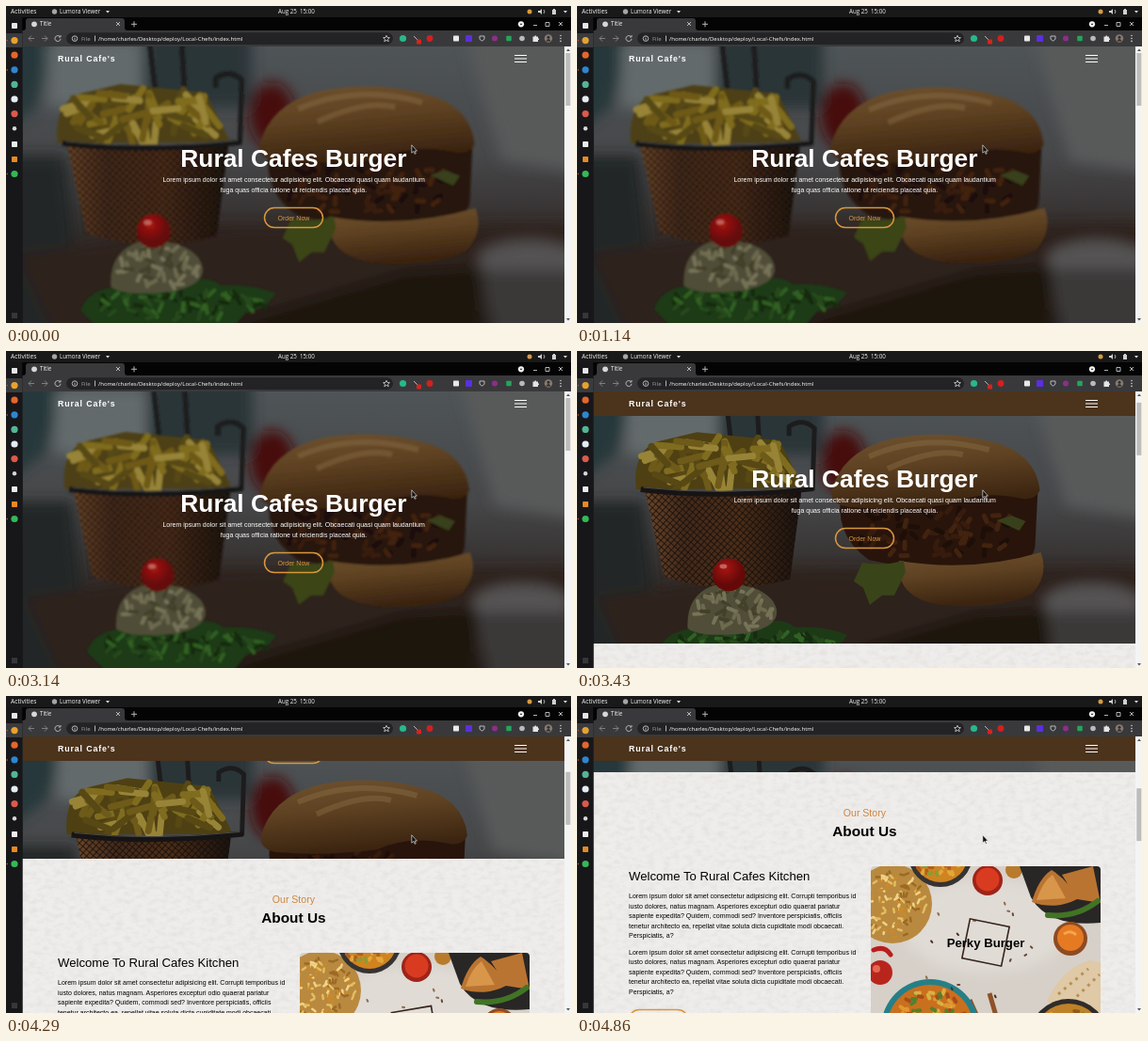
An HTML page for the animation above (5.01 s loop, 600 by 337 pixels).

```html
<!DOCTYPE html>
<html lang="en">
<head>
<meta charset="utf-8">
<title>Title</title>
<style>
html, body { margin: 0; width: 100%; height: 100%; overflow: hidden; background: #000; }
svg { display: block; width: 600px; height: 337px; }
text { white-space: pre; }
.page { font: 7.03px "Liberation Sans", Arial, sans-serif; }
.ui { font: 6.2px "Open Sans", "Noto Sans", sans-serif; fill: #f2f2f2; }
.url { font-size: 6px; }
.mid { text-anchor: middle; }
.bold { font-weight: bold; }
.line { fill: none; stroke: #c4c6c8; stroke-width: .9; }
.button { fill: none; stroke: #d8963f; stroke-width: 1.5; }
</style>
</head>
<body>
<svg viewBox="0 0 600 337">
<defs>
  <clipPath id="view"><rect x="17.5" y="43" width="576" height="294"/></clipPath>
  <clipPath id="card"><rect x="312" y="437" width="244" height="200" rx="4"/></clipPath>
  <filter id="soft"><feGaussianBlur stdDeviation=".8"/></filter>
  <filter id="haze" x="-30%" y="-30%" width="160%" height="160%"><feGaussianBlur stdDeviation="7"/></filter>
  <filter id="wall" x="0" y="0" width="100%" height="100%">
    <feTurbulence type="fractalNoise" baseFrequency=".12 .2" numOctaves="4" seed="4"/>
    <feColorMatrix values="0 0 0 0 .55  0 0 0 0 .53  0 0 0 0 .51  .5 0 0 0 -.2"/>
  </filter>
  <linearGradient id="room" x2="0" y2="1">
    <stop offset="0" stop-color="#50575a"/><stop offset=".4" stop-color="#464749"/>
    <stop offset=".62" stop-color="#332e2c"/><stop offset="1" stop-color="#1c1513"/>
  </linearGradient>
  <linearGradient id="bun" x2=".25" y2="1">
    <stop offset="0" stop-color="#6f522f"/><stop offset=".45" stop-color="#5f4222"/><stop offset="1" stop-color="#3b2410"/>
  </linearGradient>
  <linearGradient id="copper">
    <stop offset="0" stop-color="#6a4528"/><stop offset=".25" stop-color="#43291a"/>
    <stop offset=".6" stop-color="#4c2d17"/><stop offset="1" stop-color="#1b120e"/>
  </linearGradient>
  <radialGradient id="tomato" cx=".4" cy=".3"><stop offset="0" stop-color="#a81512"/><stop offset="1" stop-color="#650908"/></radialGradient>
  <pattern id="mesh" width="5" height="5" patternUnits="userSpaceOnUse" patternTransform="rotate(42)">
    <path d="M0 0H5M0 0V5" stroke="#120d0b" stroke-width="1.6"/>
  </pattern>
</defs>

<g clip-path="url(#view)">
  <g id="photo">
    <rect x="-20" y="20" width="660" height="350" fill="url(#room)"/>
    <g filter="url(#haze)">
      <path d="M-10 30H65L40 110 0 140Z" fill="#26373a"/>
      <path d="M52 42H150V110H52Z" fill="#646b6c"/>
      <path d="M150 30H262V110H150Z" fill="#2b3437"/>
      <path d="M480 30H620V180L520 165Z" fill="#595a5a"/>
      <path d="M-10 160H70L90 350H-10Z" fill="#242526"/>
      <ellipse cx="283" cy="118" rx="24" ry="34" fill="#46100f"/>
      <path d="M20 262L220 232 620 230V300L330 350H60Z" fill="#2e231f"/>
      <path d="M200 345L420 280 500 275V350Z" fill="#1b1311"/>
      <ellipse cx="548" cy="268" rx="52" ry="20" fill="#545352"/>
      <path d="M498 278H620V350H512Z" fill="#3b3939"/>
    </g>
    <g filter="url(#soft)">
      <path d="M157 43l6 52M190 43l3 50M225 90V80Q240 70 252 82L250 148" fill="none" stroke="#1d1c1d" stroke-width="5"/>
      <path d="M62 147Q58 106 85 96L127 86 215 95 240 146Z" fill="#4e4012"/>
      <g id="fries"/>
      <path d="M72 150H238L226 243Q155 262 92 240Z" fill="url(#copper)"/>
      <path d="M72 150H238L226 243Q155 262 92 240Z" fill="url(#mesh)"/>
      <path d="M67 147Q150 157 251 146" fill="none" stroke="#171415" stroke-width="6"/>
      <path d="M70 145Q150 154 248 144" fill="none" stroke="#4c4a47"/>
      <path d="M282 145H490L487 207Q485 226 460 229 400 242 310 222 270 195 282 145Z" fill="#28140b"/>
      <g id="patty"/>
      <path d="M342 223Q420 236 493 214Q502 238 484 258Q450 276 385 270Q338 262 342 223Z" fill="url(#bun)"/>
      <path d="M270 150Q280 108 330 94Q385 82 440 96Q488 108 492 148Q488 158 474 157Q430 147 395 163Q340 170 290 166Q270 164 270 150Z" fill="url(#bun)"/>
      <path d="M310 112Q370 86 438 105M330 125Q380 102 410 110" fill="none" stroke="#8d7049" stroke-width="6" opacity=".4"/>
      <path d="M303 225q22 4 44-2l2 12-12 25-13 0-13 10-7-18-10-7Z" fill="#3a4419"/>
      <path d="M446 180l16-5 15 6-7 10Z" fill="#37401b"/>
      <path d="M86 320q6-20 32-24l80-6q20-7 33 4 28-2 56 8-9 16-31 20l-14 17H105Z" fill="#1d3a16"/>
      <g id="lettuce"/>
      <path d="M117 295Q115 258 147 249 190 245 207 265 224 290 182 300 130 306 117 295Z" fill="#504e38"/>
      <g id="slaw"/>
      <circle cx="161" cy="238" r="17.500" fill="url(#tomato)"/>
      <ellipse cx="155" cy="229" rx="4" ry="2.500" fill="#d0847c" opacity=".7"/>
    </g>
  </g>

  <g id="scroll" class="page">
    <g class="mid" fill="#fff">
      <text class="bold" x="305.4" y="170.5" font-size="26.35">Rural Cafes Burger</text>
      <text x="305.6" y="187.2">Lorem ipsum dolor sit amet consectetur adipisicing elit. Obcaecati quasi quam laudantium</text>
      <text x="305.4" y="197.8">fuga quas officia ratione ut reiciendis placeat quia.</text>
      <text x="305.4" y="227.5" fill="#d8963f">Order Now</text>
    </g>
    <rect class="button" x="274.5" y="214.6" width="62" height="21" rx="10.5"/>

    <rect x="17" y="337" width="577" height="290" fill="#efedeb"/>
    <rect x="17" y="337" width="577" height="290" filter="url(#wall)"/>
    <text class="mid" x="305.4" y="384" font-size="10.54" fill="#cc8440">Our Story</text>
    <text class="mid bold" x="305.4" y="405" font-size="15.4">About Us</text>
    <text x="55" y="452" font-size="13.15">Welcome To Rural Cafes Kitchen</text>
    <g id="copy"/>
    <rect class="button" x="55.5" y="589.4" width="62" height="21" rx="10.5"/>

    <g clip-path="url(#card)">
      <rect x="312" y="437" width="244" height="200" fill="#d6d0c9"/>
      <ellipse cx="435" cy="500" rx="90" ry="50" fill="#e0dbd5" filter="url(#haze)"/>
      <circle cx="335" cy="477" r="42" fill="#b9893f"/>
      <g id="rice"/>
      <circle cx="386" cy="425" r="34" fill="#363334"/><circle cx="386" cy="425" r="29" fill="#cf8420"/>
      <g id="curry"/>
      <circle cx="436" cy="452" r="16" fill="#9e2419"/><circle cx="436" cy="451" r="12.5" fill="#d93b20"/>
      <circle cx="464" cy="441" r="9" fill="#b87b2c"/>
      <path d="M470 437H556V497Q500 502 482 470Z" fill="#292626"/>
      <path d="M483 475Q490 450 504 441 522 452 531 472 508 484 483 475ZM515 446L548 437 556 476 531 472Z" fill="#ba7431"/>
      <path d="M488 473Q494 454 505 446L519 471Z" fill="#d8964b"/>
      <path d="M500 489Q530 492 553 474" fill="none" stroke="#417424" stroke-width="6" stroke-linecap="round"/>
      <circle cx="524" cy="514" r="18" fill="#8e4b24"/><circle cx="524" cy="513" r="14" fill="#e67a22"/>
      <path d="M517 509q7-5 13 1" fill="none" stroke="#f5a44a" stroke-width="3"/>
      <path d="M499 580Q515 545 545 537L560 540V594H510Z" fill="#dfc9a6"/>
      <path d="M511 573L543 546M525 581L555 552" stroke="#b9905a" stroke-width="3" stroke-dasharray="3 5"/>
      <path d="M315 526Q327 521 333 531" fill="none" stroke="#b91e1c" stroke-width="5" stroke-linecap="round"/>
      <circle cx="322" cy="550" r="13" fill="#b8251c"/><circle cx="318" cy="546" r="4" fill="#e56752"/>
      <path d="M417 579l8 18M438 572l7 24" stroke="#8f5128" stroke-width="5"/>
      <circle cx="375" cy="609" r="52" fill="#267f87"/><circle cx="375" cy="609" r="46" fill="#c9701e"/>
      <g id="stew"/>
      <circle cx="522" cy="620" r="42" fill="#2e2b2a"/><circle cx="522" cy="620" r="37" fill="#bf8128"/>
      <g id="spice"/>
    </g>
    <rect id="frame" x="412.7" y="496.7" width="42.6" height="42.6" fill="none" stroke="#36231b" stroke-width="1.6"/>
    <text class="mid bold" x="434" y="523" font-size="13.18">Perky Burger</text>
  </g>

  <rect id="nav" x="17" y="43" width="577" height="26" fill="#4b331c"/>
  <text class="page bold" x="55" y="59.2" fill="#fff" style="font-size:8.8px;letter-spacing:.88px">Rural Cafe's</text>
  <path d="M540 52.5h13M540 56h13M540 59.5h13" stroke="#fff" stroke-width="1.1"/>
</g>

<rect x="593" y="43" width="7" height="294" fill="#f4f4f4"/>
<path d="M595 48l2-2.5 2 2.5ZM595 332l2 2.5 2-2.5Z" fill="#555"/>
<rect id="thumb" x="594.3" y="50" width="5" height="56" fill="#bdbdbd"/>

<rect width="600" height="12" fill="#191919"/>
<rect y="12" width="17.5" height="325" fill="#17171a"/>
<rect y="29" width="17.5" height="15" fill="#3b3b3e"/>
<rect x="17.5" y="12" width="582.5" height="14" fill="#040404"/>
<path d="M18 26q3 0 3-3v-7q0-3 3-3h99q3 0 3 3v7q0 3 3 3Z" fill="#39393b"/>
<rect x="17.5" y="26" width="582.5" height="17" fill="#39393b"/>
<rect x="64" y="28.3" width="347" height="12.6" rx="6.3" fill="#232325"/>
<g class="ui">
  <text x="5" y="8.4" style="font-size:6.7px">Activities</text>
  <text x="57" y="8.4">Lumora Viewer</text>
  <text x="289" y="8.4">Aug 25  15:00</text>
  <text x="36" y="21.3">Title</text>
  <text class="url" x="80" y="37" fill="#a0a3a6">File</text>
  <text class="url" x="98" y="37" fill="#fff">/home/charles/Desktop/deploy/Local-Chefs/index.html</text>
</g>
<path d="M106 5h4l-2 2.5ZM592 5h4l-2 2.5Z" fill="#ddd"/>
<path d="M565 5h2l2-2v6l-2-2h-2ZM580 4h4v5h-4ZM581 3h2v1h-2Z" fill="#d0d0d0"/>
<g class="line">
  <path d="M571 4q2 2 0 4M117 17l4 4m0-4l-4 4M133 19.3h6m-3-3v6"/>
  <path d="M534 20.5h4M547 17.5h4v4h-4ZM561 17l4 4m0-4l-4 4" transform="translate(26 0)"/>
  <path d="M57 32.3a3 3 0 1 0 1 2.5M58 31v2h-2M94.5 31.5v6"/>
  <path d="M30 34.5h-6m3-3l-3 3 3 3M38 34.5h6m-3-3l3 3-3 3" stroke="#85878a"/>
  <circle cx="73" cy="34.6" r="2.8"/><path d="M73 34v2.3M73 32.7v.6"/>
  <path d="M404 31.3l1 2.2 2.4.2-1.8 1.6.6 2.4-2.2-1.3-2.2 1.3.6-2.4-1.8-1.6 2.4-.2Z"/>
  <path d="M433 32l5 5M503 32h5v3q-2.5 4-5 0Z"/>
</g>
<path d="M559.5 32.5h2v-1h1.5v1h2v2h1v1.5h-1v2h-5.5Z" fill="#e4e4e4"/>
<path d="M589 31.5v.1m0 2.8v.1m0 2.8v.1" stroke="#ddd" stroke-width="1.5" stroke-linecap="round"/>
<rect x="436" y="35.5" width="5" height="5" rx="1" fill="#d5251d"/>
<g id="icons"/>
<path d="M430.8 147.8v8.4l2-1.7 1.3 2.8 1.2-.5-1.3-2.7h2.5Z" fill="#111" stroke="#fff" stroke-width=".6"/>
</svg>

<script>
const $ = id => document.getElementById(id);

let seed = 7;
const random = () => (seed = seed * 16807 % 2147483647) / 2147483647;

// Random short strokes inside an ellipse.
function scatter(id, count, cx, cy, rx, ry, length, width, colors) {
  let out = "";
  for (let i = 0; i < count; i++) {
    const a = random() * 2 * Math.PI, r = Math.sqrt(random()), d = random() * Math.PI;
    const dx = length * Math.cos(d), dy = length * Math.sin(d);
    const x = cx + rx * r * Math.cos(a) - dx / 2, y = cy + ry * r * Math.sin(a) - dy / 2;
    out += `<path d="M${x} ${y}l${dx} ${dy}" stroke="${colors[i % colors.length]}" stroke-width="${width}" stroke-linecap="round"/>`;
  }
  $(id).innerHTML += out;
}
scatter("fries", 50, 146, 119, 78, 25, 26, 7, ["#7f6c1f", "#978437", "#574814", "#6e5a19"]);
scatter("patty", 70, 382, 192, 92, 28, 7, 5, ["#371c0e", "#1d0e08", "#42230f"]);
scatter("lettuce", 70, 187, 314, 88, 15, 8, 4, ["#26491b", "#162c11", "#316024"]);
scatter("slaw", 45, 165, 275, 42, 22, 8, 4, ["#6d6a4f", "#434129", "#767358"]);
scatter("rice", 110, 335, 477, 36, 36, 4, 2.5, ["#e2bd61", "#c98a2b", "#efd38a", "#9b6a25"]);
scatter("curry", 40, 384, 428, 25, 22, 3, 4, ["#e2a63c", "#b25f19", "#8c9a35"]);
scatter("stew", 90, 375, 606, 40, 38, 4, 4, ["#e0972f", "#a94a18", "#55802c", "#d9b044"]);
scatter("spice", 40, 522, 618, 32, 32, 4, 4, ["#d9a03a", "#8f5a1d", "#5f8030"]);
scatter("spice", 14, 430, 523, 75, 55, 2, 2, ["#65483a", "#8d6c50", "#4b2f25"]);

const lines = [
  "Lorem ipsum dolor sit amet consectetur adipisicing elit. Corrupti temporibus id",
  "iusto dolores, natus magnam. Asperiores excepturi odio quaerat pariatur",
  "sapiente expedita? Quidem, commodi sed? Inventore perspiciatis, officiis",
  "tenetur architecto ea, repellat vitae soluta dicta cupiditate modi obcaecati.",
  "Perspiciatis, a?"
];
$("copy").innerHTML = [471, 530.8].map(top => lines.map((line, i) =>
  `<text x="55" y="${top + i * 10.54}">${line}</text>`).join("")).join("");

const disc = (x, y, r, fill) => `<circle cx="${x}" cy="${y}" r="${r}" fill="${fill}"/>`;
const box = (x, y, s, fill) => `<rect x="${x - s / 2}" y="${y - s / 2}" width="${s}" height="${s}" rx=".8" fill="${fill}"/>`;
const dock = ["#e7a22e", "#e5662c", "#2f86cf", "#53b596", "#e4edf3", "#dc5a4b", "#d8d8d8"];
$("icons").innerHTML =
  box(9, 21, 6, "#e6e6e6") +
  dock.map((color, i) => disc(9, 36.6 + i * 15.6, i == 6 ? 2.2 : 3.6, color)).join("") +
  box(9, 147, 6, "#ececec") + box(9, 163, 6, "#e68a24") + disc(9, 178.5, 3.6, "#35b957") +
  [0, 1, 2].map(i => [0, 1, 2].map(j => box(7 + i * 2, 327 + j * 2, 1.1, "#aaa")).join("")).join("") +
  [36.6, 68, 178.5].map(y => disc(1.3, y, .7, "#d7572c")).join("") +
  disc(51.5, 6, 2.7, "#a5a5a5") + disc(556, 6, 2.5, "#d99a42") + disc(30, 19.3, 2.9, "#d5d7d9") +
  disc(547, 19.3, 3.1, "#f4f4f4") + `<path d="M545.5 18.7h3l-1.5 1.8Z" fill="#222"/>` +
  disc(421.5, 34.5, 3.6, "#27b88b") + disc(450, 34.5, 3.4, "#d3201f") + box(478, 34.5, 6, "#e8e8e8") +
  box(491.5, 34.5, 7, "#5b2fe0") + disc(519, 34.5, 3, "#8b2f8a") + box(534, 34.5, 5.5, "#27a35c") +
  disc(548, 34.5, 2.8, "#b8bbbd") + disc(576, 34.5, 4.2, "#857b72") +
  disc(576, 33.3, 1.5, "#342c2a") + `<path d="M573.3 37.5q2.7-5 5.4 0Z" fill="#342c2a"/>`;

const LOOP = 5010, HOLD = 570, STEP = 1000 / 7;

function draw(step) {
  const time = step < 0 ? 0 : HOLD + step * STEP;
  const scroll = Math.max(0, 23 * (step - 18.87));
  const zoom = 1.03 - .03 * time / 3140;
  $("photo").setAttribute("transform", `translate(305 190) scale(${zoom}) translate(-305 -190)`);
  $("scroll").setAttribute("transform", `translate(0 ${-scroll})`);
  $("frame").setAttribute("transform", `rotate(${1 + 5.3 * (step - 28)} 434 518)`);
  $("thumb").setAttribute("y", 50 + scroll * .188);
  $("nav").setAttribute("visibility", scroll > 0 ? "visible" : "hidden");
}

const start = performance.now();
let shown;
function tick() {
  const ms = (performance.now() - start) % LOOP;
  // Frame times are rounded to 10 ms, hence the 5 ms slack.
  const step = Math.max(-1, Math.floor((ms - HOLD + 5) / STEP));
  if (step !== shown) draw(shown = step);
  requestAnimationFrame(tick);
}
tick();
</script>
</body>
</html>
```
